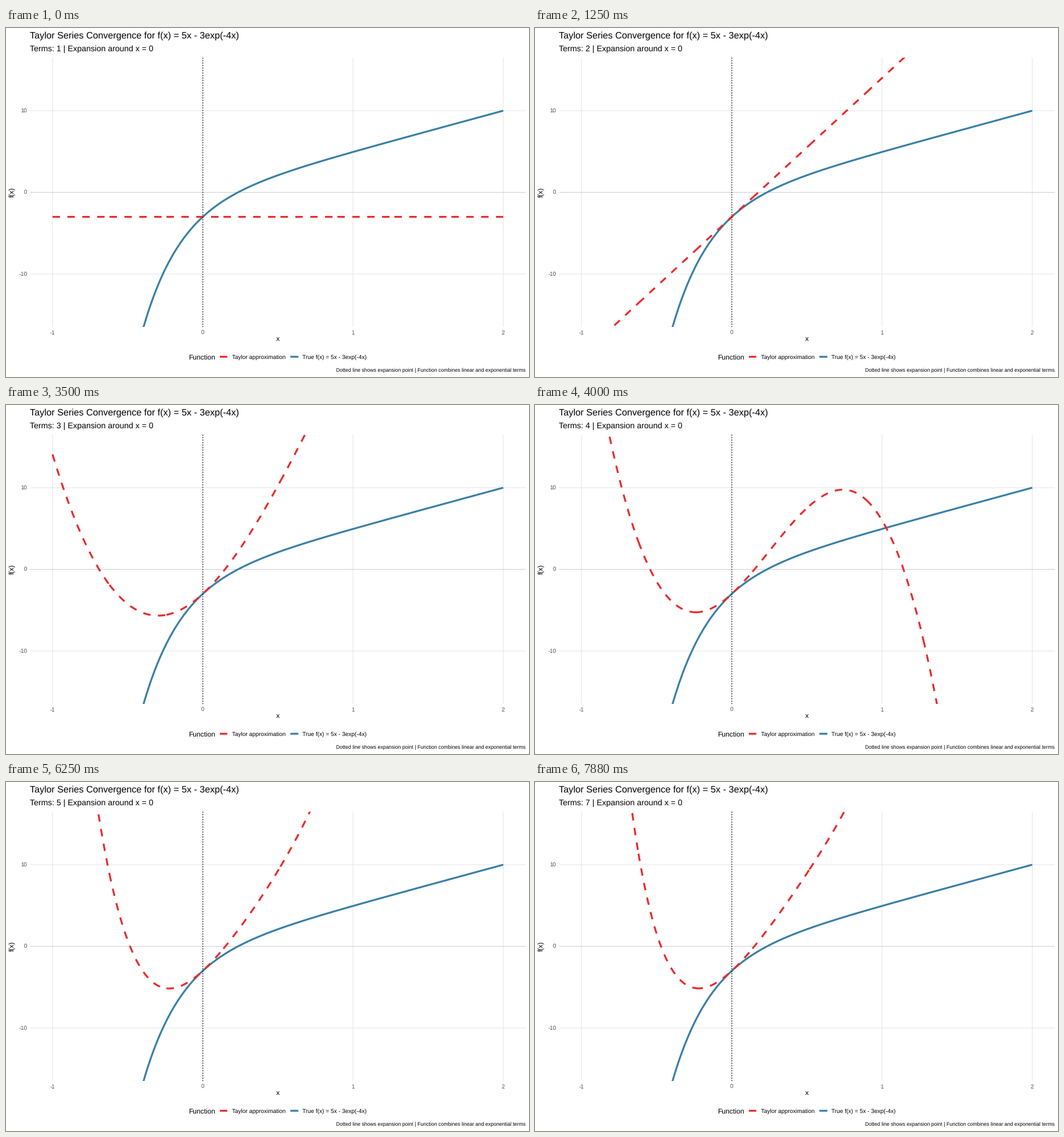
Animation, 900 px wide and 600 px high, one loop 8000 ms. Source, as a matplotlib script:

```python
import math
import numpy as np
import matplotlib.pyplot as plt
from matplotlib.animation import FuncAnimation
from matplotlib.lines import Line2D

plt.rcParams.update({
    "font.family": "Liberation Sans",
    "text.hinting": "none",
    "path.simplify": False,
    "path.snap": False,
    "lines.solid_capstyle": "butt",
    "lines.solid_joinstyle": "round",
})

W, H = 900, 600
LEFT, RIGHT, TOP, BOTTOM = 41.3, 894.5, 50.9, 514.2
X_LIM, Y_LIM = (-1.15, 2.15), (-16.5, 16.5)
X_SCALE = (RIGHT - LEFT) / (X_LIM[1] - X_LIM[0])
Y_SCALE = (BOTTOM - TOP) / (Y_LIM[1] - Y_LIM[0])
RED, BLUE = "#EB2A2A", "#3A7FA6"
GRID, TICK = "#E6E6E6", "#4D4D4D"
LINE_WIDTH = 3.2
DASH = 4 * LINE_WIDTH
STROKE = 101          # curve segments per pen stroke; dashing restarts with each

FRAMES, INTERVAL = 64, 125
CYCLE, MOVE = 11, 7   # frames per state, frames spent moving

fig = plt.figure(figsize=(W / 72, H / 72), dpi=72, facecolor="white")
ax = fig.add_axes([LEFT / W, 1 - BOTTOM / H, (RIGHT - LEFT) / W, (BOTTOM - TOP) / H])
ax.set_xlim(*X_LIM)
ax.set_ylim(*Y_LIM)
ax.axis("off")


def label(x, y, text, size, color="black", ha="left", **kw):
    """Text with its baseline at pixel (x, y), counted from the top left."""
    return fig.text(x / W, 1 - y / H, text, fontsize=size, color=color,
                    ha=ha, va="baseline", **kw)


def legend_key(x0, x1, color):
    y = 1 - 565.2 / H
    fig.add_artist(Line2D([x0 / W, x1 / W], [y, y], color=color, lw=LINE_WIDTH))


def term(n, x):
    sign = -3 if n < 2 else 3
    value = sign * (-4 * x) ** n / math.factorial(n)
    return value + 5 * x if n == 1 else value


def ease(t):
    return 4 * t ** 3 if t < 0.5 else 1 - 4 * (1 - t) ** 3


def dashes(x, y):
    """Cut one stroke into dashes of equal length on screen."""
    steps = np.hypot(np.diff(x) * X_SCALE, np.diff(y) * Y_SCALE)
    length = np.concatenate([[0], np.cumsum(steps)])
    starts = np.arange(0, length[-1], 2 * DASH)
    along = np.minimum(starts[:, None] + np.linspace(0, DASH, 9), length[-1])
    gap = np.full((len(starts), 1), np.nan)
    return [np.hstack([np.interp(along, length, v), gap]).ravel() for v in (x, y)]


def dashed_curve(x, y):
    strokes = [dashes(x[i:i + STROKE + 1], y[i:i + STROKE + 1])
               for i in range(0, len(x) - 1, STROKE)]
    return np.hstack(strokes)


for gx in (-1, 0, 1, 2):
    ax.axvline(gx, color=GRID, lw=1.07, snap=False)
    label(LEFT + (gx - X_LIM[0]) * X_SCALE, 527, str(gx), 9.8, TICK, "center")
for gy in (-10, 0, 10):
    ax.axhline(gy, color=GRID, lw=1.07, snap=False)
    label(36.4, TOP + (Y_LIM[1] - gy) * Y_SCALE + 3.6, str(gy), 9.8, TICK, "right")

xs = np.linspace(-1, 2, 800)
ax.plot(xs, 5 * xs - 3 * np.exp(-4 * xs), color=BLUE, lw=LINE_WIDTH, zorder=3)
taylor, = ax.plot([], [], color=RED, lw=LINE_WIDTH, snap=False, zorder=4)
ax.axhline(0, color="#808080", alpha=0.22, lw=1.07, snap=False, zorder=5)
ax.axvline(0, color="black", lw=1.5, ls=(0, (0.95, 1.9)), dash_capstyle="butt",
           snap=False, zorder=5)

label(41.3, 18, "Taylor Series Convergence for f(x) = 5x - 3exp(-4x)", 16)
subtitle = label(41.3, 40, "", 14)
label(467.6, 538, "x", 12, ha="center")
label(14.2, 282.6, "f(x)", 12, ha="center", rotation=90, rotation_mode="anchor")
label(314.2, 570, "Function", 12)
legend_key(368, 380.8, RED)
label(388.8, 569.3, "Taylor approximation", 10)
legend_key(489.3, 503.1, BLUE)
label(510.2, 569.3, "True f(x) = 5x - 3exp(-4x)", 10)
label(894.5, 591, "Dotted line shows expansion point | "
      "Function combines linear and exponential terms", 8.8, ha="right")


def update(frame):
    state, step = divmod(frame + CYCLE - 3, CYCLE)
    t = min(step / MOVE, 1)
    ys = sum(term(n, xs) for n in range(state)) + ease(t) * term(state, xs)
    terms = state + (t > 0.5)
    taylor.set_data(*dashed_curve(xs, ys))
    subtitle.set_text(f"Terms: {terms} | Expansion around x = 0")
    return taylor, subtitle


anim = FuncAnimation(fig, update, frames=FRAMES, interval=INTERVAL,
                     repeat=True, repeat_delay=0)
plt.show()
```
